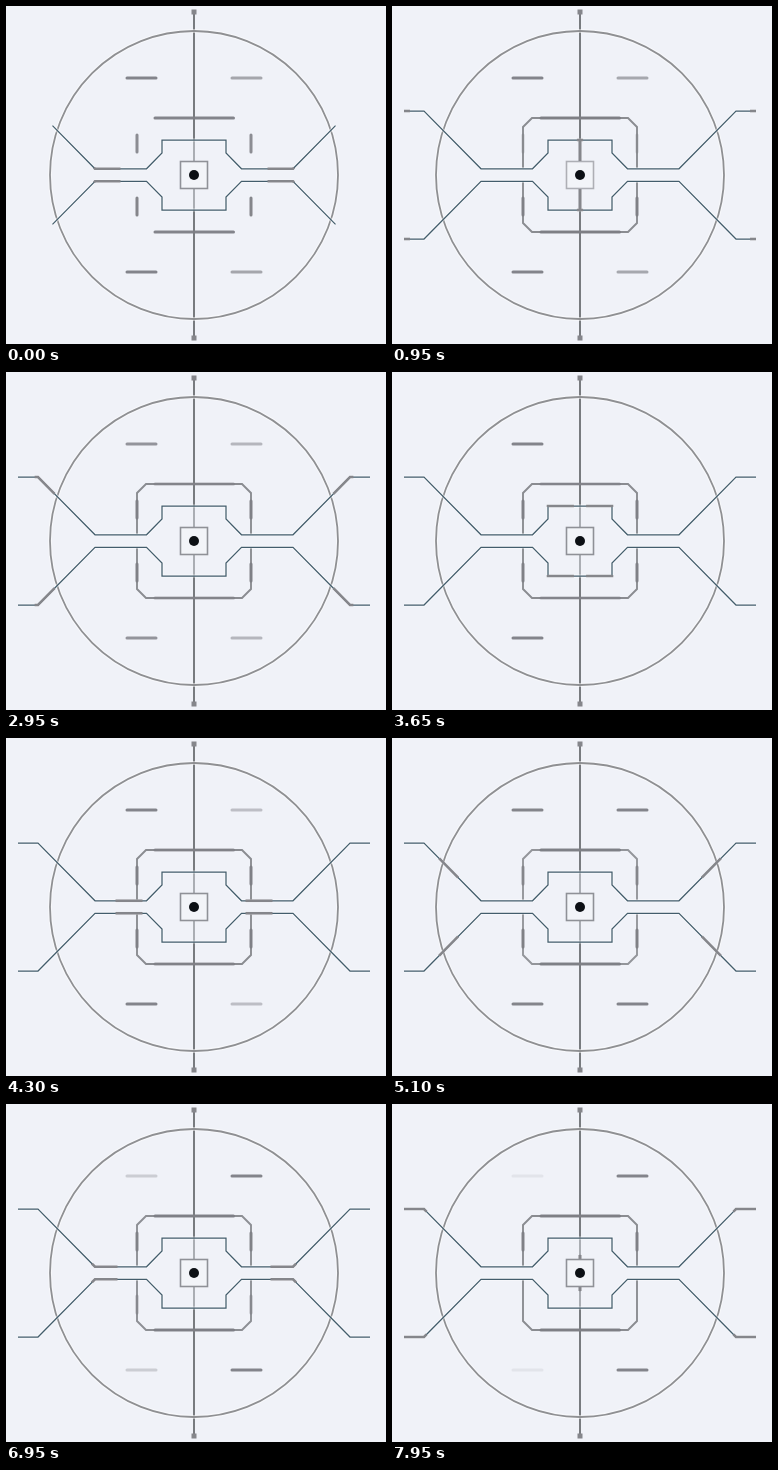
Animation of 380x338 px, one loop 8000 ms. Source, as an HTML page with a canvas:

```html
<!DOCTYPE html>
<html lang="en">
<head>
<meta charset="utf-8">
<title>Circuit</title>
<style>
html, body { margin: 0; width: 100%; height: 100%; overflow: hidden; background: #f0f2f8; }
canvas { display: block; width: 380px; height: 338px; }
</style>
</head>
<body>
<canvas id="stage"></canvas>
<script>
const W = 380, H = 338, LOOP = 8000;
const CX = 188, CY = 169;
const PERIOD = 2400, FIRST = 710, SPEED = 0.1, PULSE = 27;
const GREY = '#85868b', WIRE = '#435d6c', HALO = 'rgba(255, 255, 255, .5)';

const canvas = document.getElementById('stage');
const ctx = canvas.getContext('2d');
const dpr = window.devicePixelRatio || 1;
canvas.width = W * dpr;
canvas.height = H * dpr;

// One quarter of the circuit, relative to the centre; the rest is mirrored.
const route = [[0, -14], [0, -35], [-32, -35], [-32, -22], [-47.5, -6.25],
               [-99, -6.25], [-156, -64], [-176, -64]];
const wire = route.slice(1);
const bracket = [[-57, -7], [-57, -48], [-48, -57], [0, -57]];

// A group is bright except around its dips.
const dips = {
  ring:  [{ at: 0, depth: 1, span: 900 }, { at: 5950, depth: .45, span: 1200 }],
  bars:  [{ at: 3400, depth: .45, span: 1700 }],
  upper: [{ at: 950, depth: .6, span: 1200 }, { at: 5950, depth: 1, span: 1200 }],
  lower: [{ at: 7950, depth: 1, span: 1800 }],
  left:  [{ at: 2300, depth: .28, span: 1300 }, { at: 7950, depth: .83, span: 3000 }],
  right: [{ at: 500, depth: .38, span: 1600 }, { at: 3650, depth: 1, span: 1300 }],
  core:  [{ at: 950, depth: .3, span: 900 }]
};

function level(name, t) {
  let v = .95;
  for (const { at, depth, span } of dips[name]) {
    const u = Math.min(1, Math.abs(t - at) / span);
    v -= depth * (1 + Math.cos(Math.PI * u)) / 2;
  }
  return Math.max(0, v);
}

function stroke(points, color, width) {
  ctx.beginPath();
  points.forEach(([x, y]) => ctx.lineTo(x, y));
  ctx.strokeStyle = color;
  ctx.lineWidth = width;
  ctx.stroke();
}

function withAlpha(a, draw) {
  ctx.globalAlpha = a;
  draw();
  ctx.globalAlpha = 1;
}

function mirrored(draw) {
  for (const sx of [1, -1]) {
    for (const sy of [1, -1]) {
      ctx.save();
      ctx.scale(sx, sy);
      draw();
      ctx.restore();
    }
  }
}

function bar(x1, y1, x2, y2) {
  ctx.lineCap = 'round';
  stroke([[x1, y1], [x2, y2]], '#7e7f85', 3);
  ctx.lineCap = 'butt';
}

// Strokes only the stretch of a path from one distance to another.
function stretch(points, from, length, color, width) {
  ctx.setLineDash([length, 999]);
  ctx.lineDashOffset = -from;
  stroke(points, color, width);
  ctx.setLineDash([]);
}

function pulseTails(t) {
  // The opening pulse is already under way and moves a little faster.
  const tails = [114 + t * 0.127].filter(tail => tail < 245);
  for (let start = FIRST; start <= t; start += PERIOD) {
    tails.push((t - start) * SPEED - PULSE);
  }
  return tails;
}

function drawAxis() {
  for (const s of [1, -1]) {
    stroke([[0, -163 * s], [0, -35 * s]], '#515357', 1.5);
    stroke([[0, -35 * s], [0, -14 * s]], '#85898e', 1.3);
    ctx.fillStyle = GREY;
    ctx.fillRect(-2.5, -163 * s - 2.5, 5, 5);
  }
}

function drawCircle() {
  ctx.beginPath();
  ctx.arc(0, 0, 144, 0, Math.PI * 2);
  ctx.strokeStyle = HALO;
  ctx.lineWidth = 4;
  ctx.stroke();
  ctx.strokeStyle = '#8f9093';
  ctx.lineWidth = 1.8;
  ctx.stroke();
}

function drawWires(t) {
  const grown = Math.min(230, 179 + t * 0.13);
  mirrored(() => stretch(wire, 0, grown, HALO, 3.2));
  mirrored(() => stretch(wire, 0, grown, WIRE, 1.25));
}

function drawBars(t) {
  withAlpha(level('bars', t), () => {
    for (const s of [1, -1]) bar(-39, 57 * s, 39.5, 57 * s);
  });
  for (const [name, s] of [['upper', -1], ['lower', 1]]) {
    withAlpha(level(name, t), () => {
      for (const x of [-57, 57]) bar(x, 23 * s, x, 40 * s);
    });
  }
  for (const [name, s] of [['left', -1], ['right', 1]]) {
    withAlpha(level(name, t), () => {
      for (const y of [-97, 97]) bar(38 * s, y, 67 * s, y);
    });
  }
}

function drawCore(t) {
  ctx.fillStyle = '#f2f4f8';
  ctx.fillRect(-13.5, -13.5, 27, 27);
  ctx.strokeStyle = '#8b8d92';
  ctx.lineWidth = 1.6;
  withAlpha(level('core', t), () => ctx.strokeRect(-13.5, -13.5, 27, 27));
  ctx.beginPath();
  ctx.arc(0, 0, 5, 0, Math.PI * 2);
  ctx.fillStyle = '#0c1014';
  ctx.fill();
}

function draw(t) {
  ctx.setTransform(dpr, 0, 0, dpr, 0, 0);
  ctx.fillStyle = '#f0f2f8';
  ctx.fillRect(0, 0, W, H);
  ctx.translate(CX, CY);

  drawAxis();
  drawCircle();
  withAlpha(level('ring', t), () => mirrored(() => stroke(bracket, '#85878c', 1.9)));
  drawWires(t);
  drawBars(t);
  for (const tail of pulseTails(t)) {
    mirrored(() => stretch(route, tail, PULSE, GREY, 2.6));
  }
  drawCore(t);
}

const began = performance.now();
function frame() {
  draw((performance.now() - began) % LOOP);
  requestAnimationFrame(frame);
}
frame();
</script>
</body>
</html>
```
